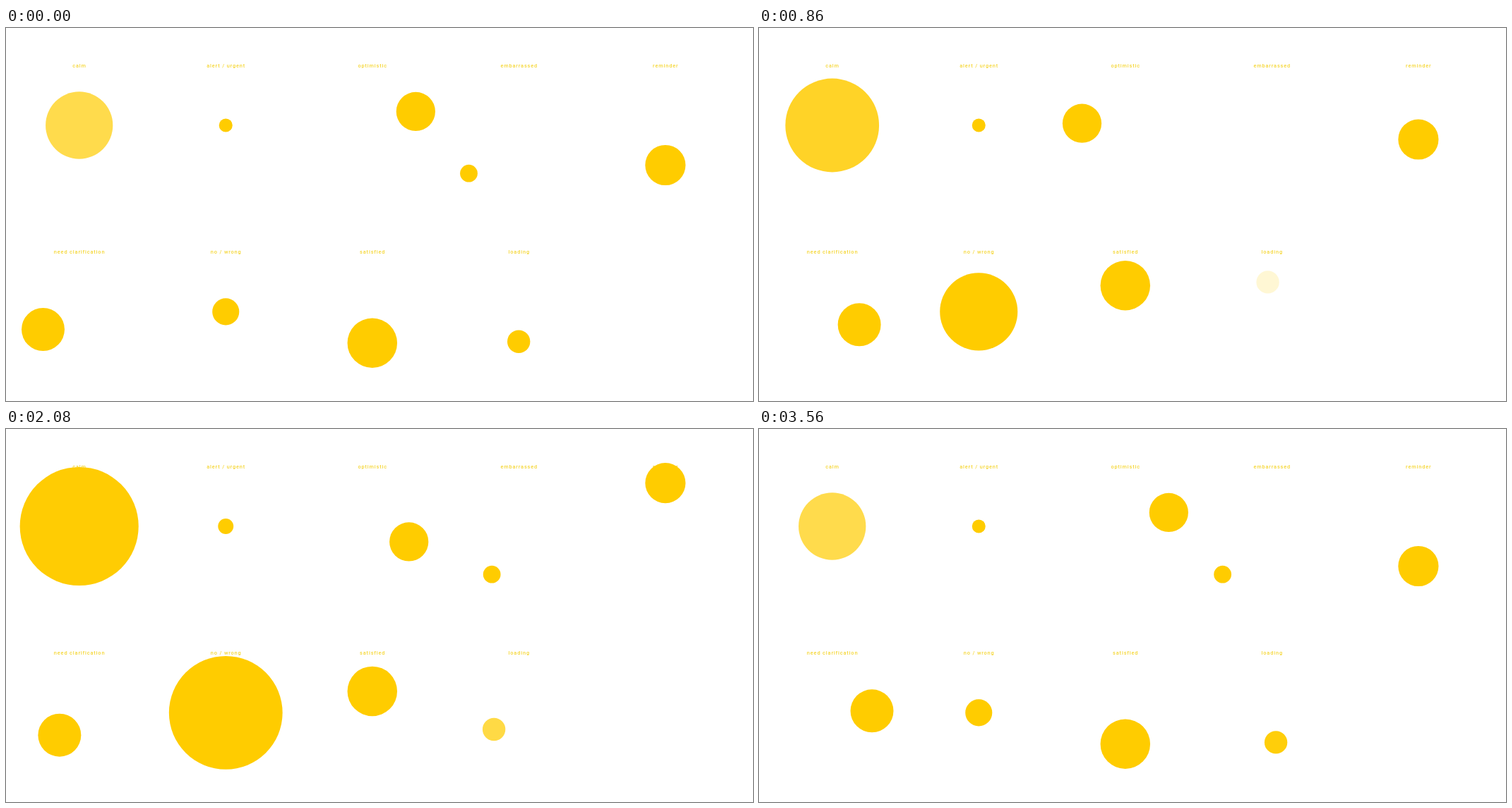
Animation, 1058 px wide and 529 px high, one loop 3.58 s. Source, as an HTML page with a canvas:

```html
<!DOCTYPE html>
<html lang="en">
<head>
<meta charset="utf-8">
<title>Dot moods</title>
<style>
  html, body { margin: 0; width: 100%; height: 100%; overflow: hidden; background: #fff; }
  canvas { display: block; width: 1058px; height: 529px; }
</style>
</head>
<body>
<canvas id="stage"></canvas>
<script>
const W = 1058, H = 529, LOOP = 3580, CYCLE = 1800;
const UNIT = 95.25; // radius at scale 1
const TOP = 138, BOTTOM = 402.4;
const canvas = document.getElementById('stage');
const ctx = canvas.getContext('2d');
const dpr = window.devicePixelRatio || 1;
canvas.width = W * dpr;
canvas.height = H * dpr;

const labels = ['calm', 'alert / urgent', 'optimistic', 'embarrassed', 'reminder',
  'need clarification', 'no / wrong', 'satisfied', 'loading'];
const column = i => 103.7 + 207.55 * i;

const clamp = v => Math.min(1, Math.max(0, v));
const mix = (a, b, k) => a + (b - a) * k;
const linear = (t, start, length) => clamp((t - start) / length);

function ease(t, start, length) {
  const u = linear(t, start, length);
  return u * u * (3 - 2 * u);
}

// Eases 0 to 1, holds, and eases back to 0.
const trip = (t, start, length, hold = 0) =>
  ease(t, start, length) - ease(t, start + length + hold, length);

function dot(x, y, scale, alpha = 1) {
  ctx.globalAlpha = alpha;
  ctx.beginPath();
  ctx.arc(x, y, UNIT * scale, 0, Math.PI * 2);
  ctx.fill();
  ctx.globalAlpha = 1;
}

function calm(t) {
  const k = trip(t, 0, 1740, 120);
  dot(column(0), TOP, mix(0.5, 0.9, k), mix(0.7, 1, k));
}

function alertDot(p) {
  const flash = p < 540 ? trip(p % 270, 0, 135) : 0;
  dot(column(1), TOP, mix(0.1, 0.9, flash));
}

function optimistic(p) {
  const a = mix(97, -81.5, trip(p, 20, 850)) * Math.PI / 180;
  dot(column(2) + 62 * Math.sin(a), 126 + 62 * Math.cos(a), 0.29);
}

function embarrassed(p) {
  const home = 655.5, leaving = p < 800;
  const x = leaving ? mix(home, 788.5, ease(p, 0, 870)) : mix(770.5, home, ease(p, 895, 920));
  const alpha = leaving ? 1 - linear(p, 600, 124) : linear(p, 880, 120);
  dot(x, 206.2, 0.13, alpha);
}

function reminder(p) {
  const hop = 121 * trip(p, 0, 311) + 40 * trip(p, 622, 202);
  dot(column(4), 194.5 - hop, 0.3);
}

// Steps back and forth over three resting places.
function needClarification(t) {
  const step = Math.floor(t / 600);
  const zigzag = n => 2 - Math.abs(n % 4 - 2);
  const s = mix(zigzag(step), zigzag(step + 1), ease(t % 600, 100, 300));
  const first = Math.min(s, 1), second = Math.max(s - 1, 0);
  dot(52.5 + 67.3 * first + 40.2 * second, 427.5 + 19.3 * first - 47 * second, 0.32);
}

function wrong(p) {
  dot(column(1), BOTTOM, mix(0.2, 0.9, trip(p, 0, 340, 360)));
}

function satisfied(p) {
  const lift = 93.7 * trip(p, 0, 395, 600) - 29 * trip(p, 395, 300);
  dot(column(2), 446.7 - lift, 0.37);
}

function loading(p) {
  const a = p / CYCLE * Math.PI * 2;
  const fade = 1 - Math.abs(2 * p / CYCLE - 1);
  dot(column(3) - 42.4 * Math.sin(a), BOTTOM + 42.4 * Math.cos(a), 0.17, 1 - 0.87 * fade);
}

function drawLabels() {
  ctx.font = '500 7.4px Roboto, sans-serif';
  ctx.letterSpacing = '0.84px';
  ctx.textAlign = 'center';
  ctx.fillStyle = '#f5d633';
  labels.forEach((text, i) => ctx.fillText(text, column(i % 5) + 0.4, i < 5 ? 55.5 : 320));
}

function draw(t) {
  const p = t % CYCLE;
  ctx.setTransform(dpr, 0, 0, dpr, 0, 0);
  ctx.fillStyle = '#fff';
  ctx.fillRect(0, 0, W, H);
  drawLabels();
  ctx.fillStyle = '#fc0';
  calm(t);
  needClarification(t);
  for (const mood of [alertDot, optimistic, embarrassed, reminder, wrong, satisfied, loading]) mood(p);
}

const start = performance.now();
function frame() {
  draw((performance.now() - start) % LOOP);
  requestAnimationFrame(frame);
}
frame();
</script>
</body>
</html>
```
